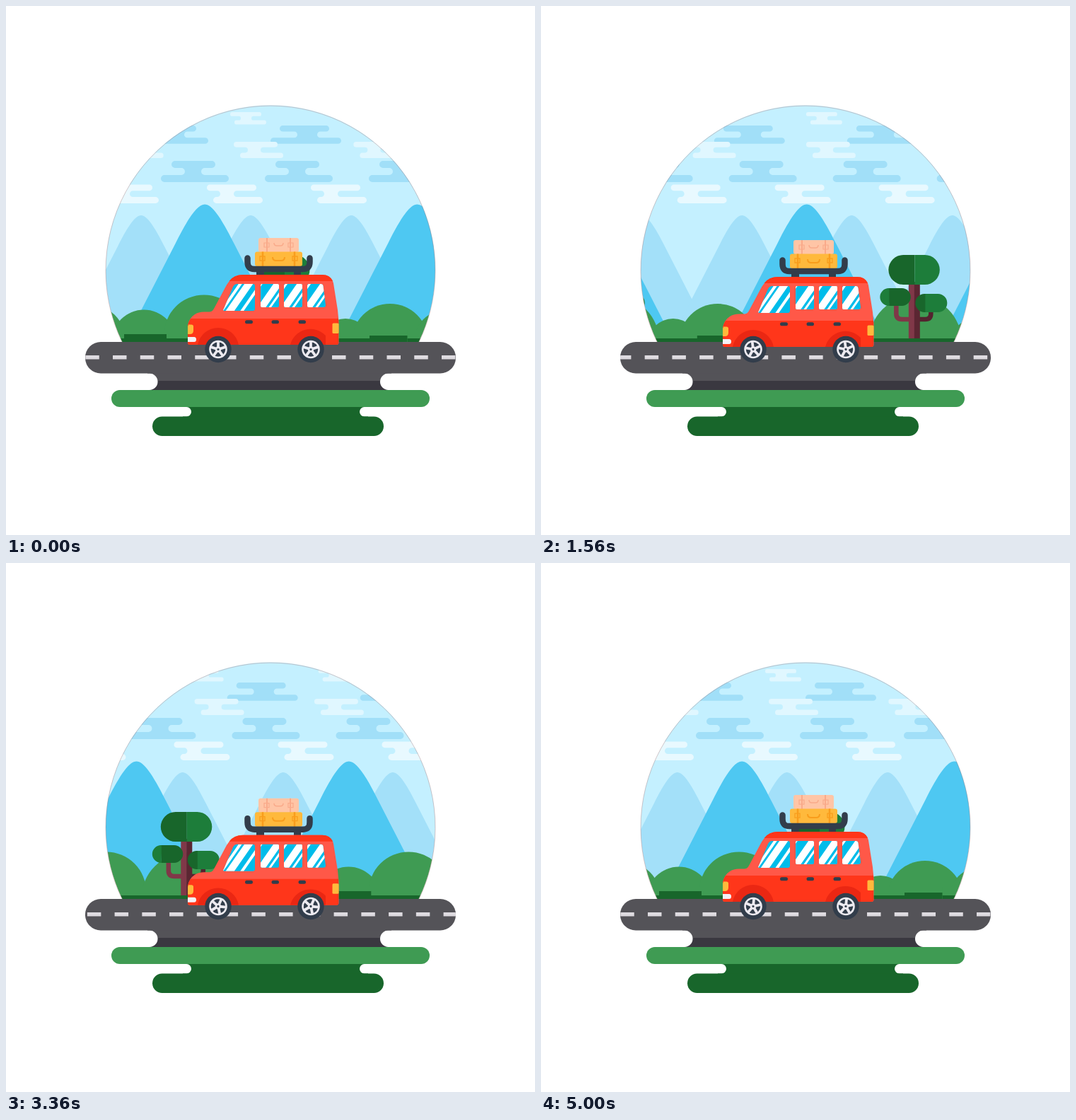
Write an HTML page that moves like this. It is 748x748 px and loops after 5.04 s.

```html
<!DOCTYPE html>
<html lang="en">
<head>
<meta charset="utf-8">
<title>Road trip</title>
<style>
  html, body { margin: 0; width: 100%; height: 100%; overflow: hidden; background: #fff; }
  svg { display: block; width: 100vw; height: 100vh; }
</style>
</head>
<body>
<svg viewBox="0 0 748 748">
  <defs>
    <clipPath id="globe"><path d="M141 140H607V476H141Z" clip-path="url(#disc)"/></clipPath>
    <clipPath id="disc"><circle cx="374" cy="373.3" r="233"/></clipPath>
    <clipPath id="roadClip"><rect x="112" y="475" width="524" height="44.5" rx="22"/></clipPath>
    <path id="panes" d="M327 393H349Q352 393 352 396V428Q352 431 349 431H309Q306 431 308 428L321 397Q323 393 327 393Z
      M362 393H384Q386 393 386 395V424Q386 426 384 426H362Q360 426 360 424V395Q360 393 362 393Z
      M395 393H417Q419 393 419 395V424Q419 426 417 426H395Q393 426 393 424V395Q393 393 395 393Z
      M428 393H445Q448 393 448.500 396L452 423Q452 426 449 426H428Q426 426 426 424V395Q426 393 428 393Z"/>
    <clipPath id="glass"><use href="#panes"/></clipPath>
    <path id="peak" d="M-130 233L-33 44C-18 14 -8 0 0 0S18 14 33 44L130 233Z"/>
    <g id="wheel">
      <circle r="18.700" fill="#323d4b"/>
      <circle r="12.800" fill="#eceaf0"/>
      <g class="spin">
        <circle r="10.200" fill="#323d4b"/>
        <g id="spokes" stroke="#eceaf0" stroke-width="3.800"></g>
        <circle r="4.200" fill="#eceaf0"/>
        <circle r="1.600" fill="#323d4b"/>
      </g>
    </g>
  </defs>

  <g clip-path="url(#globe)">
    <rect x="140" y="139" width="470" height="340" fill="#c4f0ff"/>
    <g id="tinyClouds" fill="#e0f7ff"></g>
    <g id="topClouds" fill="#a1dff8"></g>
    <g id="midClouds" fill="#e0f7ff"></g>
    <g id="lowClouds"></g>
    <g id="farPeaks" fill="#a3e0f9">
      <use href="#peak" x="191" y="296"/>
      <use href="#peak" x="346" y="296"/>
    </g>
    <g id="nearPeaks" fill="#4ec8f2"><use href="#peak" transform="translate(281 280.500) scale(1.250)"/></g>
    <g id="meadow">
      <g fill="#3f9b53">
        <circle cx="195" cy="475" r="45.500"/>
        <circle cx="280" cy="465" r="56.500"/>
        <circle cx="395" cy="475" r="65.500"/>
        <circle cx="480" cy="478" r="36"/>
        <circle cx="543" cy="475" r="54"/>
        <rect x="140" y="458" width="431" height="18"/>
      </g>
      <path d="M140 470H571V476H140ZM167 464H227V471H167ZM514 466H586V471H514Z" fill="#18662b"/>
      <g transform="translate(357 0)">
        <g fill="none" stroke-width="6.500">
          <path d="M11 422V435Q11 443 19 443H30" stroke="#803848"/>
          <path d="M60 431V435Q60 443 52 443H42" stroke="#54232f"/>
        </g>
        <path d="M28.500 390H37V470H28.500Z" fill="#803848"/>
        <path d="M36.500 390H44.500V470H36.500Z" fill="#5b2632"/>
        <path d="M37 352H21A21 21 0 0 0 21 394H37ZM-0.500 399H19A12.500 12.500 0 0 1 19 424H1ZM53 407H51A13 13 0 0 0 51 433H53Z" fill="#18662b"/>
        <path d="M37 352H51.500A21 21 0 0 1 51.500 394H37ZM1 399H0.500A12.500 12.500 0 0 0 0.500 424H1ZM52 407H70A13 13 0 0 1 70 433H52Z" fill="#1d7d3a"/>
      </g>
    </g>
  </g>
  <path d="M164 475A233 233 0 1 1 584 475" fill="none" stroke="#a87878" stroke-opacity=".5" stroke-width=".8"/>

  <path d="M200 519H545V531H200Z" fill="#545358"/>
  <path d="M200 530H545V544H200Z" fill="#3a3840"/>
  <rect x="150" y="519.500" width="64.500" height="23.500" rx="11.750" fill="#fff"/>
  <rect x="529" y="519.500" width="64.500" height="23.500" rx="11.750" fill="#fff"/>
  <rect x="112" y="475" width="524" height="44.500" rx="22" fill="#545358"/>
  <g clip-path="url(#roadClip)"><g id="dashes"><rect x="151" y="494" width="19.500" height="5.500" fill="#dedbe0"/></g></g>
  <rect x="149" y="543" width="450" height="24" rx="12" fill="#3f9b53"/>
  <path d="M250 567H512V582H250Z" fill="#18662b"/>
  <rect x="200" y="567" width="62" height="13.500" rx="6.750" fill="#fff"/>
  <rect x="500" y="567" width="62" height="13.500" rx="6.750" fill="#fff"/>
  <rect x="207" y="580.500" width="327" height="27.500" rx="13.750" fill="#18662b"/>

  <g id="car">
    <rect x="357" y="328" width="57" height="20" rx="3" fill="#ffc5a6"/>
    <g fill="none" stroke="#f9aa8a" stroke-width="2">
      <path d="M369 328V348M402 328V348"/>
      <path d="M379 335Q379 339 383 339H388Q392 339 392 335" stroke-width="1.500"/>
      <path d="M365 335h7v6h-7zM399 335h7v6h-7z" stroke-width="1.200"/>
    </g>
    <rect x="352" y="347.500" width="67" height="20.500" rx="3" fill="#ffb93c"/>
    <g fill="none" stroke="#f99d1c" stroke-width="2.500">
      <path d="M363 347.500V368M408 347.500V368"/>
      <path d="M377 355Q377 360 382 360H389Q394 360 394 355" stroke-width="2"/>
      <path d="M359 354h7v6h-7zM405 354h7v6h-7z" stroke-width="1.300"/>
    </g>
    <path d="M341.500 356.500V362Q341.500 372 351 372H420Q429.500 372 429.500 362V356.500" fill="none" stroke="#323d4b" stroke-width="8.500" stroke-linecap="round"/>
    <path d="M354 374H365V381H354ZM407 374H417V381H407Z" fill="#323d4b"/>
    <path d="M257 452Q259 441 267 436Q272 432.500 280 432.500H288Q292 432 294 428L310 398Q319 380 335 380H447Q460 380 463 392L469 430L470.500 446V476Q470.500 479 467 479H260Q257 479 257 476Z" fill="#ff5848"/>
    <path d="M315.500 389Q322 380 335 380H447Q458 380 462 389Z" fill="#ff361a"/>
    <path d="M261 442H470V476Q470.500 479 467 479H260Q257 479 257 476V452Q258 446 261 442Z" fill="#ff361a"/>
    <path d="M271 479A29.500 29.500 0 0 1 329 479ZM402 479A29.500 29.500 0 0 1 452 466V479Z" fill="#ea2713"/>
    <use href="#panes" fill="#00bcea"/>
    <g id="glare" clip-path="url(#glass)" stroke="#fff"></g>
    <path d="M340.500 446.700H346.500M378 446.700H383.500M416 446.700H421.500" stroke="#323d4b" stroke-width="5" stroke-linecap="round"/>
    <path d="M258 450.500H262Q265 450.500 265 453V459Q265 464 260 464H257V453Z" fill="#ffb93c"/>
    <path d="M257 468H266Q269 468 269 471.500T266 475H257Z" fill="#f4f1f6"/>
    <rect x="461.500" y="448.500" width="9" height="14.500" rx="1.500" fill="#ffb93c"/>
  </g>
  <use href="#wheel" x="300" y="485.500"/>
  <use href="#wheel" x="431" y="485.500"/>
</svg>
<script>
const LOOP = 5040, STEP = 40;
const el = id => document.getElementById(id);

const pill = ([a, b], y, h) => {
  const r = h / 2;
  return `M${a + r} ${y}H${b - r}a${r} ${r} 0 0 1 0 ${h}H${a + r}a${r} ${r} 0 0 1 0 ${-h}Z`;
};

// Two pills joined by a neck with round notches on both sides.
function cloud(id, y, h, top, neck, bottom, fill = "") {
  const r = h / 2, l = neck[0] - r, right = neck[1] + r;
  const join = `M${l} ${y + h}a${r} ${r} 0 0 1 0 ${h}H${right}a${r} ${r} 0 0 1 0 ${-h}Z`;
  const d = pill(top, y, h) + join + pill(bottom, y + 2 * h, h);
  el(id).innerHTML += `<path d="${d}" ${fill && `fill="${fill}"`}/>`;
}

cloud("tinyClouds", 150, 5.8, [317, 361], [332, 347], [323, 368]);
cloud("topClouds", 169, 8.6, [387, 457], [412, 440], [374, 474]);
cloud("midClouds", 192, 7.7, [322, 384], [342, 360], [331, 392]);
cloud("lowClouds", 219, 10, [234, 296], [253, 276], [219, 315], "#a1dff8");
cloud("lowClouds", 252.5, 8.8, [284, 354], [303, 322], [293, 363], "#e8f9ff");

for (let a = 0; a < 360; a += 72)
  el("spokes").innerHTML += `<path d="M0 0V-11" transform="rotate(${a})"/>`;

for (const [x, w] of [[318, 4], [330, 10], [347, 4], [371, 10], [383, 3], [404, 10], [416, 3], [437, 10], [449, 3]])
  el("glare").innerHTML += `<path d="M${x - 16} 435L${x + 16} 389" stroke-width="${w}"/>`;

// id, tile width, speed in px per ms, furthest travel
const layers = [
  ["tinyClouds", 185, .0371, 185],
  ["topClouds", 188, .0377, 188],
  ["midClouds", 169.3, .0339, 169.3],
  ["lowClouds", 147, .0299, 147],
  ["farPeaks", 297.2, .0598],
  ["nearPeaks", 300.5, .0607],
  ["meadow", 427.5, .0861, 427.5],
  ["dashes", 38.75, .0469, 232.5],
].map(([id, width, speed, limit = Infinity]) => {
  const node = el(id), tile = node.innerHTML, reach = Math.ceil(700 / width);
  node.innerHTML = "";
  for (let i = -reach; i <= reach; i++)
    node.innerHTML += `<g transform="translate(${i * width} 0)">${tile}</g>`;
  return { node, width, speed, limit };
});

// The body sinks faster than it rises again.
function bob(t) {
  const p = t / 2520 % 1, peak = .36;
  return 5 * (p < peak ? p / peak : (1 - p) / (1 - peak));
}

const spinner = document.querySelector(".spin"), car = el("car");
function draw(now) {
  const t = Math.floor(now % LOOP / STEP) * STEP;
  for (const { node, width, speed, limit } of layers)
    node.setAttribute("transform", `translate(${Math.min(speed * t, limit) % width} 0)`);
  car.setAttribute("transform", `translate(0 ${bob(t)})`);
  spinner.setAttribute("transform", `rotate(${-360 * t / 2520})`);
}

const start = performance.now();
function tick() {
  draw(performance.now() - start);
  requestAnimationFrame(tick);
}
tick();
</script>
</body>
</html>
```
